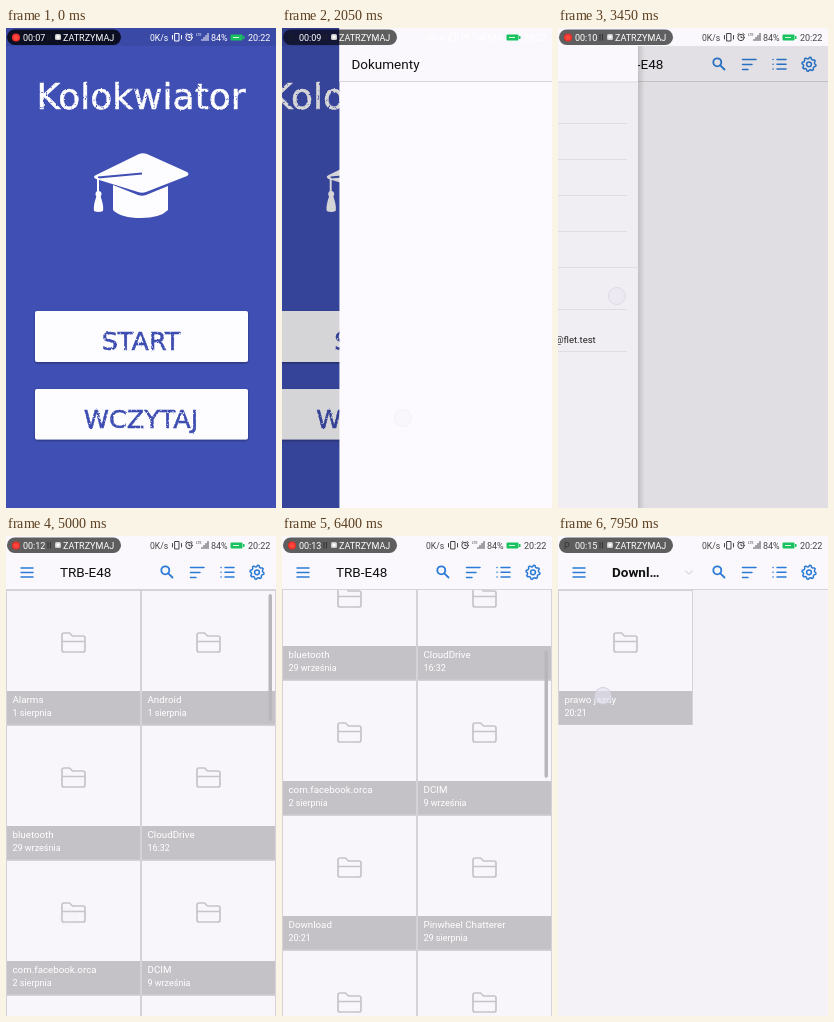
These frames come from a looping animation (270x480 px, 8 s). An HTML page:

```html
<!DOCTYPE html>
<html lang="pl">
<head>
<meta charset="utf-8">
<style>
html, body { margin: 0; height: 100%; overflow: hidden; background: #f8f6fa; }
svg { display: block; width: 100vw; height: 100vh; font-family: Roboto, "Noto Sans", sans-serif; }
.chalk { font-family: "DejaVu Sans", sans-serif; text-anchor: middle; filter: url(#chalk); }
.line { fill: none; stroke-linecap: round; stroke-linejoin: round; }
</style>
</head>
<body>
<svg viewBox="0 0 270 480">
  <defs>
    <filter id="chalk" x="-5%" y="-15%" width="110%" height="130%" color-interpolation-filters="sRGB">
      <feTurbulence type="fractalNoise" baseFrequency=".38" numOctaves="2" seed="4" result="noise"/>
      <feDisplacementMap in="SourceGraphic" in2="noise" scale="2" xChannelSelector="R" yChannelSelector="G" result="rough"/>
      <feColorMatrix in="noise" values="0 0 0 0 0  0 0 0 0 0  0 0 0 0 0  -7 0 0 0 5.4" result="holes"/>
      <feComposite in="rough" in2="holes" operator="in"/>
    </filter>
    <filter id="drop" x="-10%" y="-10%" width="120%" height="130%">
      <feDropShadow dx="0" dy="1" stdDeviation="1" flood-opacity=".4"/>
    </filter>
    <linearGradient id="edge">
      <stop stop-opacity=".14"/><stop offset="1" stop-opacity="0"/>
    </linearGradient>
    <g id="folder" class="line" stroke="#c6c4c8" stroke-width="1.7">
      <path d="M-11.5 7.5V-7.5Q-11.5-9.5-9.5-9.5H-4L-1-6.5H9.5Q11.5-6.5 11.5-4.5V7.5Q11.5 9.5 9.5 9.5H-9.5Q-11.5 9.5-11.5 7.5ZM-11.5-1H11.5"/>
    </g>
  </defs>

  <g id="home">
    <rect width="270" height="480" fill="#3f4fb4"/>
    <rect width="270" height="18" fill="#3a49a6"/>
    <text class="chalk" x="135" y="81" font-size="36" fill="#fff" stroke="#fff" stroke-width=".5">Kolokwiator</text>
    <g fill="#fdfcff">
      <path d="M107 157L132 167Q136 168.5 140 167L162 158V182Q154 190 135 190Q115 190 107 182Z"/>
      <path d="M90 147L133 126Q137 124.5 141 126L181 144Q184 146 181 148L140 164Q136 165.5 132 164L90 151Q86 149 90 147Z"/>
      <path d="M136 145.5L92 149.5" stroke="#3f4fb4" stroke-width="2"/>
      <path d="M92 150V165" stroke="#fdfcff" stroke-width="2"/>
      <circle cx="92.5" cy="166" r="3"/>
      <path d="M90.5 168H94.5Q98 178 97 183Q92.5 185 88 183Q87 178 90.5 168Z"/>
      <g filter="url(#drop)">
        <rect x="29" y="283" width="213" height="51" rx="2"/>
        <rect id="load" x="29" y="361" width="213" height="50.5" rx="2"/>
      </g>
    </g>
    <g font-size="25.5" fill="#3c4cb0" stroke="#3c4cb0" stroke-width=".5">
      <text class="chalk" x="135" y="322">START</text>
      <text class="chalk" x="135" y="399.5">WCZYTAJ</text>
    </g>
  </g>
  <rect id="dim" width="270" height="480"/>

  <g id="page">
    <rect id="paper" width="270" height="480"/>
    <g id="grid"></g>
    <g id="folderPage"><rect y="54" width="270" height="426" fill="#f4f2f6"/></g>
    <rect id="bar" x="262.5" width="3.5" height="127" rx="1.7" fill="#b8b6ba"/>
    <rect width="270" height="54" fill="#faf8fc"/>
    <rect y="53" width="270" height="1" fill="#d6d4d8"/>
    <text id="title" y="41.3" font-size="13.5" fill="#111"></text>
    <g id="tools" class="line" stroke="#2b7bd6" stroke-width="1.5">
      <path d="M15 32H27M15 36.5H27M15 41H27"/>
      <g stroke-width="1.8"><circle cx="159.3" cy="34.3" r="4"/><path d="M162.3 37.3L166.5 41.5"/></g>
      <path d="M184.5 31.5H198M184.5 36.5H194M184.5 41.5H190"/>
      <path d="M215 31.5H215.1M215 36.3H215.1M215 41H215.1M219 31.5H228M219 36.3H228M219 41H228"/>
      <circle cx="251" cy="36.3" r="2.4"/>
      <path id="gear"/>
    </g>
    <path id="chevron" class="line" d="M127.5 35L131 38L134.5 35" stroke="#dddbe0" stroke-width="1.2"/>
    <rect id="scrim" y="18" width="270" height="462"/>
    <g id="drawer">
      <rect x="240" y="18" width="7" height="462" fill="url(#edge)"/>
      <rect y="18" width="240" height="462" fill="#f0eef2"/>
      <rect y="18" width="240" height="36" fill="#faf8fc"/>
      <rect y="53.5" width="240" height="1" fill="#dcdade"/>
      <text x="12" y="41.3" font-size="13.5" fill="#111">Otwórz z</text>
    </g>
  </g>

  <circle id="touch" r="8.5" fill="#e4e1f2" fill-opacity=".6" stroke="#c9c6d6" stroke-width=".8"/>

  <g id="status" font-size="9">
    <text x="144" y="12.5" font-size="8.6">0K/s</text>
    <g class="line" stroke="currentColor" stroke-width="1">
      <path d="M169 5.5H173V13H169ZM166.5 7.5V11M175.5 7.5V11"/>
      <circle cx="183" cy="9.5" r="3.2"/><path d="M183 8V9.7H184.3M179.7 6.5L181 5.5M186.3 6.5L185 5.5"/>
      <path d="M196 12.5V11.5M198 12.5V9.5M200 12.5V7.5M202 12.5V5.5"/>
    </g>
    <text x="190" y="8" font-size="3.5">LTE</text>
    <text x="205" y="12.7">84%</text>
    <text x="242" y="12.7">20:22</text>
  </g>
  <rect x="224.5" y="6.5" width="12" height="6" rx="1" fill="#19c25f"/>
  <rect x="237" y="8" width="1.5" height="3" fill="#19c25f"/>
  <path d="M227 9.5H233" stroke="#d6ffe5"/>

  <rect id="pill" x="1" y="1.5" width="114" height="15.5" rx="7.7"/>
  <text x="6" y="12.5" font-size="9" fill="#222" opacity=".7">P</text>
  <path d="M42 6V12.5M44.5 6V12.5" stroke="#222" opacity=".7"/>
  <g id="dot"><circle cx="10" cy="9.5" r="4" fill="#e9302a"/><circle cx="10" cy="9.5" r="2.6" fill="#ff463c"/></g>
  <g font-size="9" fill="#fff">
    <text id="clock" x="17" y="12.7"></text>
    <rect x="49" y="6" width="6" height="6" rx="1.5" fill="#ccc"/>
    <rect x="50.5" y="7.5" width="3" height="3"/>
    <text x="57" y="12.7">ZATRZYMAJ</text>
  </g>
</svg>
<script>
const $ = id => document.getElementById(id);
const set = (id, attrs) => { for (const k in attrs) $(id).setAttribute(k, attrs[k]); };
const move = (id, x, y = 0) => set(id, { transform: `translate(${x} ${y})` });
const show = (id, on) => set(id, { visibility: on ? 'visible' : 'hidden' });
const prog = (t, a, b) => Math.min(1, Math.max(0, (t - a) / (b - a)));
const out = (u, k = 2) => 1 - (1 - u) ** k;
const smooth = u => u * u * (3 - 2 * u);
const pulse = (t, a, b, fade = 100) => Math.min(prog(t, a, a + fade), 1 - prog(t, b, b + fade));

// Folder tiles
const tile = (i, name, date) => `<g transform="translate(${i % 2 * 135} ${54 + 135 * (i >> 1)})">
  <rect x=".5" y=".5" width="134" height="134" fill="#f8f6fa" stroke="#d4d2d6"/>
  <use href="#folder" x="67.5" y="52.5"/>
  <rect x="1" y="101" width="133" height="33.5" fill="#c4c2c6"/>
  <g fill="#fff"><text x="6.5" y="113" font-size="9.75">${name}</text>
  <text x="6.5" y="126" font-size="9">${date}</text></g></g>`;

$('grid').innerHTML = [
  ['Alarms', '1 sierpnia'], ['Android', '1 sierpnia'],
  ['bluetooth', '29 września'], ['CloudDrive', '16:32'],
  ['com.facebook.orca', '2 sierpnia'], ['DCIM', '9 września'],
  ['Download', '20:21'], ['Pinwheel Chatterer', '29 sierpnia'],
  ['Movies', '1 sierpnia'], ['Music', '1 sierpnia']
].map(([name, date], i) => tile(i, name, date)).join('');
$('folderPage').innerHTML += tile(0, 'prawo jazdy', '20:21');

// Drawer rows: label, bottom edge, optional second line
$('drawer').innerHTML += [
  ['Ostatnie', 95], ['Obrazy', 131], ['Wideo', 167], ['Dźwięk', 203], ['Pobrane', 239],
  ['TRB-E48', 281, 'Wolne: 41,2 GB'], ['Dysk', 323, 'jarzebinowy.zeszyt.2041@flet.test']
].map(([label, y, sub]) => `<text x="54" y="${y - (sub ? 24 : 14)}" font-size="11" fill="#111">${label}</text>
  <text x="54" y="${y - 8.5}" font-size="9.5" fill="#222">${sub || ''}</text>
  <rect x="${y == 239 ? 0 : 12}" y="${y}" width="${y == 239 ? 240 : 217}" height="1" fill="#dfdde1"/>`).join('');

set('gear', { d: 'M' + Array.from({ length: 32 }, (_, i) => {
  const a = (i + .5) * Math.PI / 16, r = i % 4 < 2 ? 7 : 5.6;
  return `${(251 + r * Math.cos(a)).toFixed(1)} ${(36.3 + r * Math.sin(a)).toFixed(1)}`;
}).join('L') + 'Z' });

// The recording dot goes out at each new second
const ticks = [[450, 1000], [1450, 2100], [2500, 3000], [3650, 4000], [4500, 5000], [5750, 6000], [6500, 7000], [7500, 8000]];

function touchAt(t, scroll) {
  if (t < 2300) return [121, 390, pulse(t, 1400, 1750, 50) * .8 + .2 * pulse(t, 1700, 2050)];
  if (t < 4500) return [59, 268, pulse(t, 2950, 3400, 50) * .2 + .6 * pulse(t, 2950, 3650, 50)];
  if (t < 5850) return [62, 381 - scroll, pulse(t, 4990, 5690, 80)];
  if (t < 6500) return [62, 480 - scroll, pulse(t, 5880, 6150, 80)];
  if (t < 7400) return [60, 350, pulse(t, 6550, 6800, 80)];
  return [45, 160, pulse(t, 7680, 8000, 150)];
}

function draw(t) {
  const enter = out(prog(t, 1750, 2250), 1.68);
  move('home', -55 * enter);
  move('page', 270 * (1 - enter));
  set('dim', { opacity: .2 * enter });
  set('load', { fill: t > 1450 && t < 1900 ? '#e6e3ee' : '#fdfcff' });

  const open = out(prog(t, 2250, 2550)) - .667 * smooth(prog(t, 3150, 3450)) - .333 * out(prog(t, 3600, 3900));
  move('drawer', 240 * (open - 1));
  show('drawer', open > .001);
  set('scrim', { opacity: .28 * open });

  const scroll = 79 * smooth(prog(t, 5000, 5700)) + 101 * out(prog(t, 5880, 6400));
  move('grid', 0, -scroll);
  set('grid', { opacity: prog(t, 3650, 3900) });
  set('bar', { y: 58 + scroll * .315, opacity: t < 5000 ? 0 : 1 - prog(t, 6500, 6750) });

  const picked = t >= 3150, inside = t >= 6900;
  move('folderPage', 270 * (1 - out(prog(t, 6900, 7250))));
  show('folderPage', inside);
  set('paper', { fill: picked ? '#f8f6fa' : '#fcfafe' });
  set('title', { x: picked ? 54 : 12, 'font-weight': inside ? 600 : 400 });
  $('title').textContent = inside ? 'Downl…' : picked ? 'TRB-E48' : 'Dokumenty';
  show('tools', picked);
  show('chevron', inside);

  const [x, y, seen] = touchAt(t, scroll);
  move('touch', x, y);
  set('touch', { opacity: seen });

  const ink = t < 2250 ? '#fff' : '#444';
  set('status', { fill: ink, color: ink });
  set('pill', { 'fill-opacity': t < 1750 ? .8 : .62 });
  show('dot', !ticks.some(([a, b]) => t >= a && t < b));
  $('clock').textContent = '00:' + String(7 + ticks.filter(([a]) => t >= a).length).padStart(2, '0');
}

const start = performance.now();
(function loop() {
  draw((performance.now() - start) % 8000);
  requestAnimationFrame(loop);
})();
</script>
</body>
</html>
```
